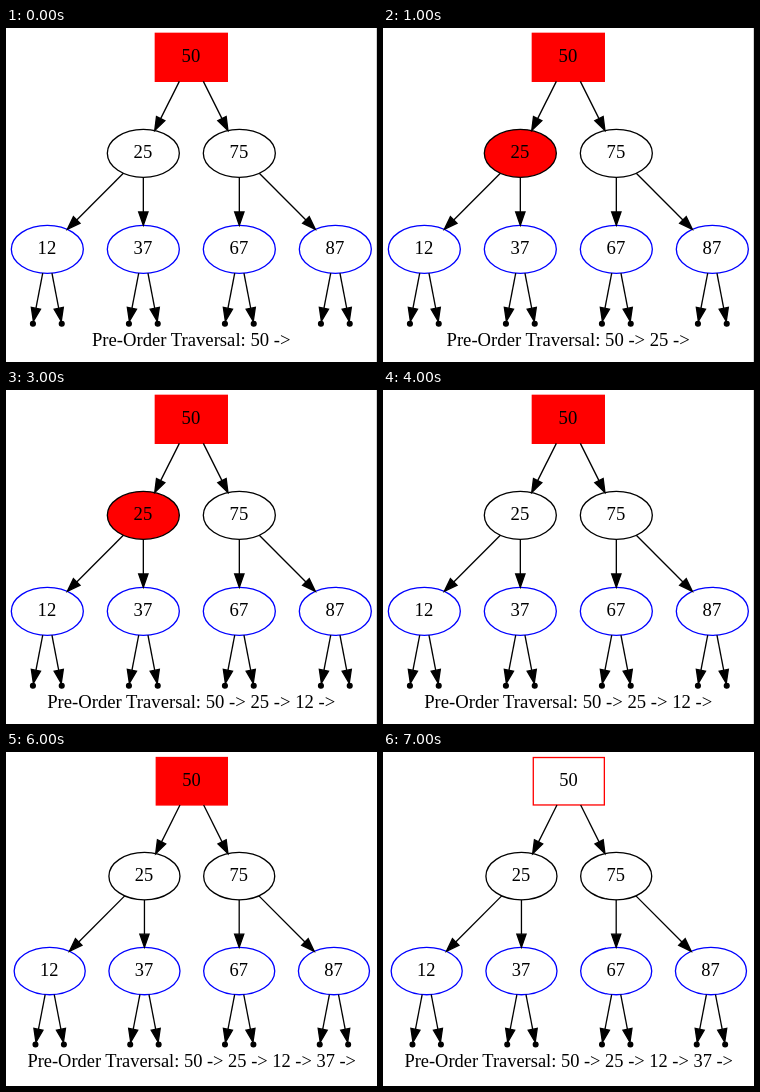
These frames come from a looping animation (371x334 px, 8000 ms). An HTML page:

```html
<!DOCTYPE html>
<html lang="en">
<head>
<meta charset="utf-8">
<title>Pre-order traversal</title>
<style>
html, body { margin: 0; width: 100%; height: 100%; overflow: hidden; background: #fff; }
svg { display: block; }
text { font: 18.67px "Liberation Serif", "Times New Roman", serif; text-anchor: middle; }
.shape { fill: #fff; stroke-width: 1.33; }
.edge { stroke: #000; stroke-width: 1.33; }
</style>
</head>
<body>
<svg width="371" height="334" viewBox="0 0 371 334">
  <rect id="border" x="370" y="0" width="1" height="334" fill="#d4d4d4"/>
  <g id="tree"></g>
</svg>
<script>
const tree = document.getElementById('tree');
const border = document.getElementById('border');
const shapes = {};
const RX = 36, RY = 24, DOT = 2.4;

function add(tag, attrs, content) {
  const el = document.createElementNS('http://www.w3.org/2000/svg', tag);
  for (const key in attrs) el.setAttribute(key, attrs[key]);
  if (content) el.textContent = content;
  return tree.appendChild(el);
}

function node(label, x, y, stroke, box) {
  const shape = box
    ? add('rect', { x: x - RX, y: y - RY, width: 2 * RX, height: 2 * RY, stroke })
    : add('ellipse', { cx: x, cy: y, rx: RX, ry: RY, stroke });
  shape.setAttribute('class', 'shape');
  shapes[label] = shape;
  add('text', { x: x - 0.4, y: y + 4.67 }, String(label));
  return { x, y, rx: box ? Infinity : RX, ry: RY };
}

function dot(x, y) {
  add('circle', { cx: x, cy: y, r: DOT, class: 'edge' });
  return { x, y, rx: DOT, ry: DOT };
}

// Arrow along the line between two centres, cut at both outlines.
function link(from, to) {
  const dx = to.x - from.x, dy = to.y - from.y;
  const length = Math.hypot(dx, dy);
  const ux = dx / length, uy = dy / length;
  const reach = n => 1 / Math.hypot(ux / n.rx, uy / n.ry);
  const start = reach(from), tip = length - reach(to), base = tip - 13.33;
  const at = (along, side) =>
    [from.x + ux * along - uy * side, from.y + uy * along + ux * side];
  add('path', { d: `M${at(start, 0)}L${at(base, 0)}`, class: 'edge' });
  add('path', { d: `M${at(tip, 0)}L${at(base, 4.67)}L${at(base, -4.67)}Z`, class: 'edge' });
}

const root = node(50, 185.33, 29.33, '#f00', true);
const inner = [25, 75].map((label, i) => node(label, 137.33 + 96 * i, 125.33, '#000'));
const leaves = [12, 37, 67, 87].map((label, i) => node(label, 41.33 + 96 * i, 221.33, '#00f'));
inner.forEach(n => link(root, n));
leaves.forEach((leaf, i) => {
  link(inner[i >> 1], leaf);
  for (const side of [-1, 1]) link(leaf, dot(leaf.x + side * 14.4, 295.73));
});
const caption = add('text', { x: 185.2, y: 318 });

// One step per second: filled nodes, and how many values are listed.
const order = [50, 25, 12, 37];
const steps = [
  [[50], 1], [[50, 25], 2], [[50, 25, 12], 3], [[50, 25], 3],
  [[50], 3], [[50, 37], 4], [[50], 4], [[], 4]
];
let shown = -1;

function draw() {
  const index = Math.floor(performance.now() % 8000 / 1000);
  if (index !== shown) {
    shown = index;
    const [filled, count] = steps[index];
    for (const label in shapes) {
      shapes[label].style.fill = filled.includes(+label) ? '#f00' : '#fff';
    }
    caption.textContent = 'Pre-Order Traversal: ' +
      order.slice(0, count).map(value => value + ' ->').join(' ');
    // The longest caption makes the whole graph shrink to fit.
    const shrunk = count === 4;
    tree.setAttribute('transform', shrunk ? 'matrix(.987 0 0 .9885 2.9 .25)' : '');
    border.style.display = shrunk ? 'none' : '';
  }
  requestAnimationFrame(draw);
}
draw();
</script>
</body>
</html>
```
